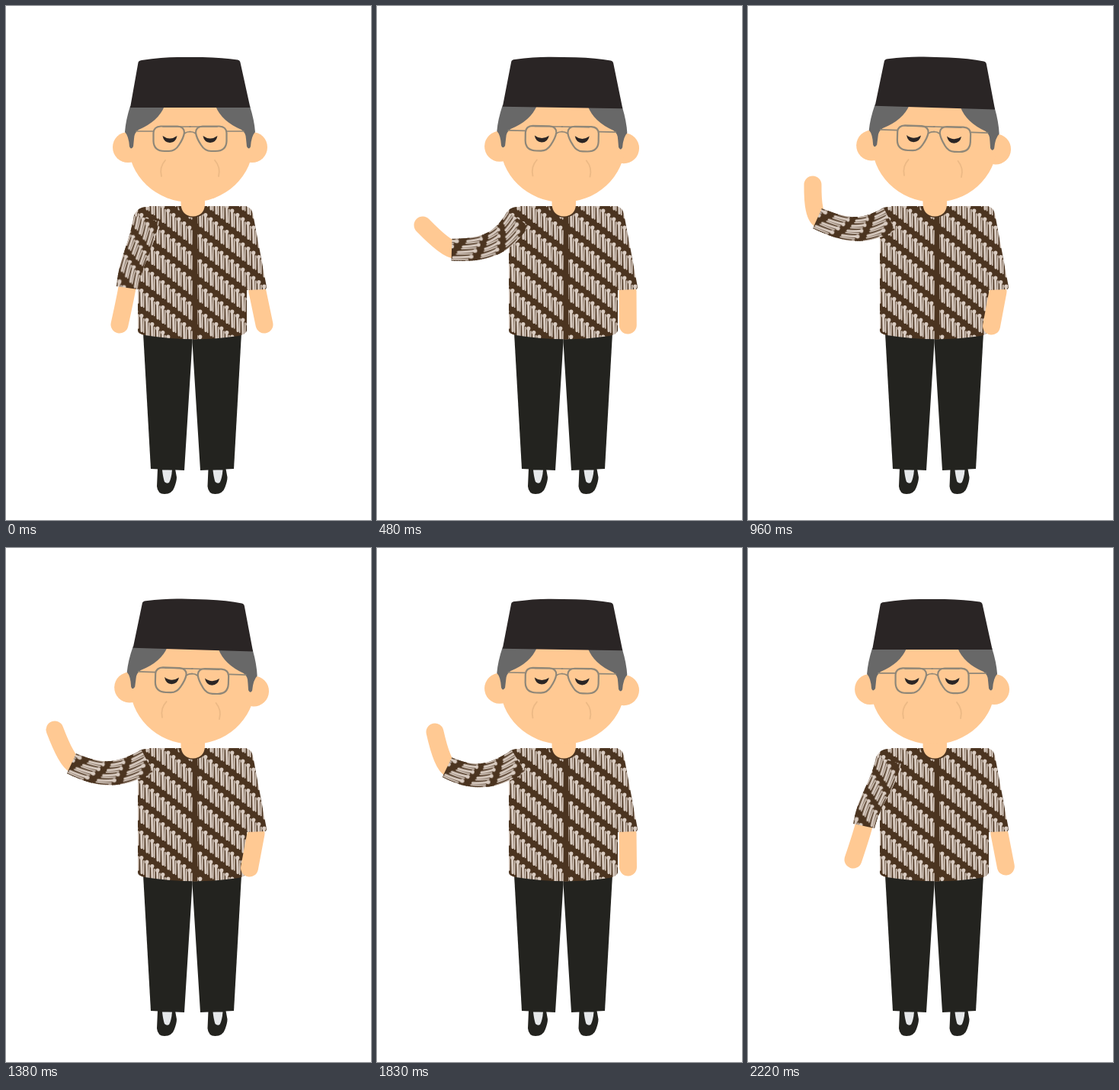
These frames come from a looping animation (479 by 673 pixels, 2.25 s). An HTML page with a canvas:

```html
<!DOCTYPE html>
<html>
<head>
<meta charset="utf-8">
<style>
  html, body { margin: 0; width: 100%; height: 100%; overflow: hidden; background: #fff; }
  canvas { display: block; }
</style>
</head>
<body>
<canvas id="stage" width="479" height="673"></canvas>
<script>
const ctx = document.getElementById('stage').getContext('2d');
const LOOP = 2250, STEP = 30;
const SKIN = '#ffc993', BROWN = '#4b3420', CREAM = '#d9ccc2', BLACK = '#23231f',
      HAT = '#2a2525', HAIR = '#686868', FRAME = '#8f8778', CREASE = '#ecb985';

// Waving arm: time, cuff x, cuff y, shoulder angle, cuff angle, hand x, hand y
const ARM = [
  [0, 159, 369, 11, 8, 149, 417],
  [240, 128, 347, 14, 65, 88, 345],
  [480, 98, 319, 32, 92, 60, 287],
  [960, 91, 278, 62, 114, 85, 234],
  [1380, 86, 282, 62, 115, 64, 238],
  [1830, 92, 287, 58, 116, 76, 241],
  [1930, 99, 319, 32, 92, 59, 287],
  [2060, 128, 347, 14, 65, 88, 345],
  [2220, 152, 364, 14, 12, 138, 408],
  [2250, 159, 369, 11, 8, 149, 417]
];
const SHOULDER = [184, 280];

function fill(path, color) {
  ctx.fillStyle = color;
  ctx.fill(new Path2D(path));
}

function stroke(path, color, width) {
  ctx.strokeStyle = color;
  ctx.lineWidth = width;
  ctx.lineCap = ctx.lineJoin = 'round';
  ctx.stroke(new Path2D(path));
}

function oval(x, y, rx, ry, color) {
  ctx.fillStyle = color;
  ctx.beginPath();
  ctx.ellipse(x, y, rx, ry, 0, 0, 7);
  ctx.fill();
}

function bothSides(axis, draw) {
  draw();
  ctx.save();
  ctx.translate(2 * axis, 0);
  ctx.scale(-1, 1);
  draw();
  ctx.restore();
}

// Diagonal rows of leaf strokes
function makeBatik() {
  const tile = document.createElement('canvas'), columns = 6, w = 42, h = 33;
  tile.width = w;
  tile.height = h;
  const g = tile.getContext('2d');
  g.fillStyle = BROWN;
  g.fillRect(0, 0, w, h);
  g.strokeStyle = g.fillStyle = CREAM;
  g.lineCap = 'round';
  const line = (x1, y1, x2, y2, width) => {
    g.lineWidth = width;
    g.beginPath();
    g.moveTo(x1, y1);
    g.lineTo(x2, y2);
    g.stroke();
  };
  for (let i = 0; i < columns; i++) {
    for (const wrap of [-h, 0, h]) {
      const x = i * w / columns + 2.6, y = i * h / columns + wrap;
      line(x, y + 4, x + 0.5, y + 24, 3.2);
      line(x + 3.3, y + 8, x + 3.1, y + 26, 1.6);
      g.beginPath();
      g.arc(x + 0.2, y + 4, 2.6, 0, 7);
      g.fill();
    }
  }
  return ctx.createPattern(tile, 'repeat');
}
const batik = makeBatik();

// Cubic Hermite interpolation through the arm keys
function armPose(t) {
  const last = ARM.length - 1;
  let i = 0;
  while (i < last - 1 && t >= ARM[i + 1][0]) i++;
  const a = ARM[i], b = ARM[i + 1], span = b[0] - a[0], u = (t - a[0]) / span;
  const slope = (k, c) => {
    const p = ARM[Math.max(k - 1, 0)], n = ARM[Math.min(k + 1, last)];
    return (n[c] - p[c]) / (n[0] - p[0]) * span;
  };
  return [1, 2, 3, 4, 5, 6].map(c =>
    a[c] * (1 + 2 * u) * (1 - u) ** 2 + slope(i, c) * u * (1 - u) ** 2 +
    b[c] * u * u * (3 - 2 * u) + slope(i + 1, c) * u * u * (u - 1));
}

function drawWavingArm(t) {
  const [cx, cy, startDeg, endDeg, hx, hy] = armPose(t);
  const dir = deg => [-Math.sin(deg * Math.PI / 180), Math.cos(deg * Math.PI / 180)];
  const [sx, sy] = SHOULDER, d0 = dir(startDeg), d1 = dir(endDeg);
  const reach = Math.hypot(cx - sx, cy - sy) * 0.42;
  const xs = [sx, sx + d0[0] * reach, cx - d1[0] * reach, cx];
  const ys = [sy, sy + d0[1] * reach, cy - d1[1] * reach, cy];

  stroke(`M${cx - d1[0] * 4} ${cy - d1[1] * 4}
    Q${cx + d1[0] * 7} ${cy + d1[1] * 7} ${hx} ${hy}`, SKIN, 23);

  // Textured slices that follow the bend
  const at = (p, u) => p[0] * (1 - u) ** 3 + 3 * p[1] * u * (1 - u) ** 2 +
    3 * p[2] * u * u * (1 - u) + p[3] * u ** 3;
  const slices = 36, length = 98;
  oval(sx, sy, 17, 17, batik);
  ctx.fillStyle = batik;
  for (let i = 1; i <= slices; i++) {
    const u = i / slices, s = u * length, width = 34 - 5 * u;
    const dx = at(xs, u) - at(xs, u - 0.01), dy = at(ys, u) - at(ys, u - 0.01);
    ctx.save();
    ctx.translate(at(xs, u), at(ys, u));
    ctx.rotate(Math.atan2(-dx, dy));
    ctx.translate(0, -s);
    ctx.fillRect(-width / 2, s - 5, width, 5);
    ctx.restore();
  }
}

function drawShoe(x) {
  ctx.save();
  ctx.translate(x, 606);
  fill('M1 0L0 23Q1 33 10 33Q20 33 23 24Q26 16 26 11L24 0Z', BLACK);
  fill('M7 1.5H20Q19 13 16 18Q13 20 10 17Q8 11 7 1.5Z', '#e6e8ea');
  ctx.restore();
}

function drawLegs() {
  drawShoe(198);
  drawShoe(264.5);
  bothSides(244.5, () => fill('M180 428L244.5 434V440L234 608L190 606Z', BLACK));
}

function drawTorso() {
  fill('M188 262H305L316 290V425Q315 430 305 432Q245 441 182 431Q173 429 173 425V290Q176 272 188 262Z', batik);
  fill('M245 272H251V436.5H245Z', BROWN);
  fill('M226 262H264Q262 276 245 277Q229 276 226 262Z', BROWN);
  fill('M229.5 245H261V260Q260 275 245 275.5Q231 275 229.5 260Z', SKIN);
}

function drawRestingArm(p) {
  stroke(`M${330 - 2 * p} 374L${339 - 19.5 * p} ${417 + 2 * p}`, SKIN, 23);
  fill('M300 262H315Q322 264 324 272L342 368L341 371L315 372L300 290Z', batik);
}

function drawHead(p) {
  ctx.save();
  ctx.translate(242, 256);
  ctx.rotate(p * 1.7 * Math.PI / 180);
  ctx.translate(-242, -256);
  bothSides(241.5, () => oval(160, 185, 20, 20, SKIN));
  oval(242.5, 180, 82, 77, SKIN);
  bothSides(241.5, () => {
    fill('M163 131H208Q200 151 174 162Q168 166 168 174L167 184Q164 189 162 184Q161 170 156 165Q157 150 163 131Z', HAIR);
    stroke('M171 164H193M206 158H242', FRAME, 1.7);
    stroke('M193.5 166Q194 158 203 157.5H225Q234 158 234 166Q233 173 227 182Q222 190 214 190H208Q194 190 193.5 177Z', FRAME, 2.2);
    stroke('M234 167Q237 164.5 242 164.5', FRAME, 1.7);
    fill('M205.5 170Q215 177 224.5 170Q223 178.5 215 179Q207 178.5 205.5 170Z', HAT);
    stroke('M209 202Q201 211 204 223', CREASE, 1.8);
  });
  fill('M163 133L173.5 74Q174 71.5 178 71Q205 67 225 67H258Q285 67.5 304 70.5Q307 71 307.5 74L320.5 133Z', HAT);
  ctx.restore();
}

function frame(now) {
  const t = Math.floor(now % LOOP / STEP) * STEP;
  const lean = Math.min(t / 960, 1, (LOOP - t) / 860);
  ctx.fillStyle = '#fff';
  ctx.fillRect(0, 0, 479, 673);
  drawLegs();
  drawTorso();
  drawWavingArm(t);
  drawRestingArm(lean);
  drawHead(lean);
  requestAnimationFrame(frame);
}
requestAnimationFrame(frame);
</script>
</body>
</html>
```
